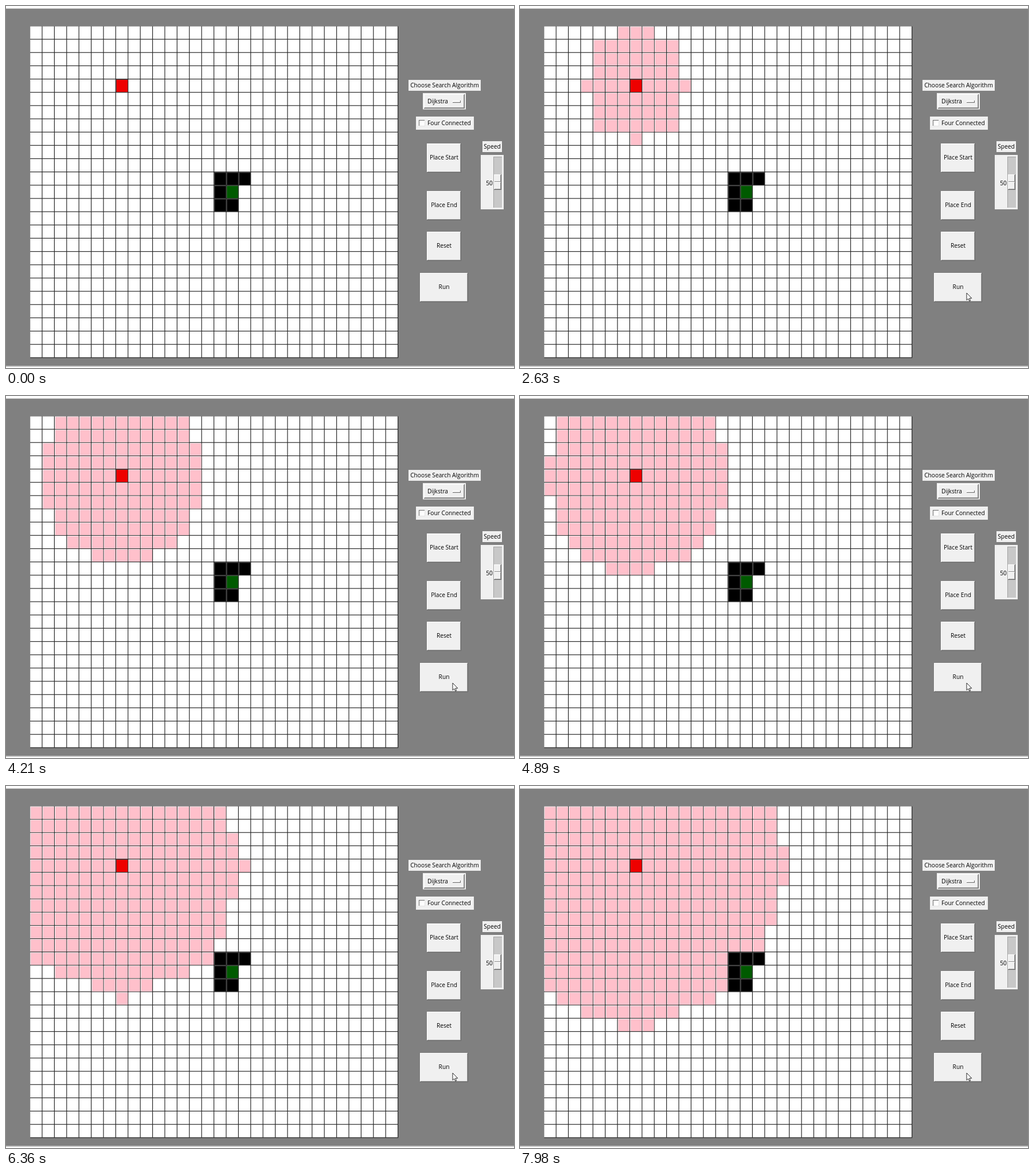
Animation of 886x632 px, one loop 8 s. Source, as an HTML page with a canvas:

```html
<!DOCTYPE html>
<html lang="en">
<head>
<meta charset="utf-8">
<title>Grid search</title>
<style>
  html, body { margin: 0; width: 100%; height: 100%; overflow: hidden; background: #fff; }
  canvas { display: block; }
</style>
</head>
<body>
<canvas id="stage" width="886" height="632"></canvas>
<script>
const ctx = document.getElementById('stage').getContext('2d');
const LOOP = 8000, COLS = 30, ROWS = 25;
const board = { x: 42.2, y: 35.5, cellW: 21.4, cellH: 23.16, gap: 1.2 };
const FACE = '#f0f0f0', LINE = '#282828';
const start = { col: 7, row: 4 }, end = { col: 16, row: 12 };
const walls = new Set(['15,11', '16,11', '17,11', '15,12', '15,13', '16,13']);
const PRESS = 1050, RELEASE = 1300;

// Number of expanded cells (the start included) at given times.
const progress = [[1290, 1], [2630, 55], [3540, 98], [4890, 149], [5700, 187],
  [7010, 240], [7880, 277], [7940, 278], [7980, 279], [8000, 279]];

// Cursor tip: time, x, y.
const cursorPath = [[130, 816, 628], [250, 809, 590], [400, 797, 544], [610, 789, 517],
  [850, 789, 517], [900, 779, 501], [8000, 779, 501]];

function interpolate(points, t) {
  if (t < points[0][0]) return null;
  const i = Math.min(points.findLastIndex(p => p[0] <= t), points.length - 2);
  const a = points[i], b = points[i + 1];
  const k = (t - a[0]) / (b[0] - a[0]);
  return a.slice(1).map((v, n) => v + (b[n + 1] - v) * k);
}

// Eight-connected Dijkstra: octile distance, ties resolved up, right, down, left.
function expansionOrder() {
  const cells = [];
  for (let row = 0; row < ROWS; row++) {
    for (let col = 0; col < COLS; col++) {
      if (walls.has(col + ',' + row) || (col === end.col && row === end.row)) continue;
      const dx = col - start.col, dy = row - start.row;
      const ax = Math.abs(dx), ay = Math.abs(dy);
      const distance = Math.max(ax, ay) + (Math.SQRT2 - 1) * Math.min(ax, ay);
      const side = ay > ax ? (dy < 0 ? 0 : 2) : (dx > 0 ? 1 : 3);
      cells.push({ key: col + ',' + row, dx, dy, distance, side });
    }
  }
  return cells.sort((a, b) =>
    a.distance - b.distance || a.side - b.side || a.dy - b.dy || a.dx - b.dx);
}
const rank = new Map(expansionOrder().map((c, i) => [c.key, i]));

function rect(x, y, w, h, color) {
  ctx.fillStyle = color;
  ctx.fillRect(x, y, w, h);
}

// Face colour and top-left highlight of a cell.
function cellColors(col, row, count) {
  const key = col + ',' + row;
  if (walls.has(key)) return ['#000', '#696969'];
  if (col === end.col && row === end.row) return ['#005a00', '#506850'];
  if (col === start.col && row === start.row) return ['#ee0000', '#804040'];
  return [rank.get(key) < count ? '#ffc0cb' : '#fff', '#fff'];
}

function drawBoard(count) {
  const { x: left, y: top, cellW, cellH, gap } = board;
  rect(left, top, COLS * cellW, ROWS * cellH, LINE);
  for (let row = 0; row < ROWS; row++) {
    for (let col = 0; col < COLS; col++) {
      const [face, light] = cellColors(col, row, count);
      const x = left + col * cellW, y = top + row * cellH;
      const w = cellW - gap, h = cellH - gap;
      rect(x, y, w, h, light);
      if (face !== light) rect(x + 0.9, y + 0.9, w - 0.9, h - 0.9, face);
    }
  }
}

function text(string, x, y, align = 'center') {
  ctx.fillStyle = '#000';
  ctx.textAlign = align;
  ctx.fillText(string, x, y);
}

function bevel(x, y, w, h, sunken = false) {
  rect(x, y, w, h, sunken ? '#fff' : '#696969');
  rect(x, y, w - 1, h - 1, sunken ? '#696969' : '#fff');
  rect(x + 1, y + 1, w - 2, h - 2, sunken ? '#e3e3e3' : '#a0a0a0');
  rect(x + 1, y + 1, w - 3, h - 3, sunken ? '#a0a0a0' : FACE);
  rect(x + 2, y + 2, w - 4, h - 4, FACE);
}

function button(label, x, y, w, h, sunken = false) {
  bevel(x, y, w, h, sunken);
  const shift = sunken ? 1 : 0;
  text(label, x + w / 2 + shift, y + h / 2 + shift);
}

function label(string, x, y, w, h) {
  rect(x, y, w, h, FACE);
  text(string, x + w / 2, y + h / 2 + 0.5);
}

function controls(t) {
  label('Choose Search Algorithm', 702, 129, 126, 19);

  rect(727, 152, 75, 28.5, FACE);
  bevel(729, 154, 71, 25);
  text('Dijkstra', 735, 167, 'left');
  rect(779, 165, 14, 4, '#696969');
  rect(779, 165, 13, 3, '#fff');
  rect(780, 166, 12, 2, FACE);

  rect(715, 193, 101, 23, FACE);
  rect(720, 199, 11, 11, '#e3e3e3');
  rect(720, 199, 10, 10, '#696969');
  rect(721, 200, 9, 9, '#fff');
  text('Four Connected', 735, 205, 'left');

  button('Place Start', 734, 240, 60, 51);
  button('Place End', 734, 323, 60, 51);
  button('Reset', 734, 394, 60, 51);
  button('Run', 722, 466, 84, 51, t >= PRESS && t < RELEASE);

  label('Speed', 831, 236, 34, 19);
  rect(828, 260, 40, 95, FACE);
  rect(850, 263, 15, 89, '#a0a0a0');
  rect(851, 264, 14, 88, '#c8c8c8');
  bevel(851, 294, 13, 27);
  rect(852, 306, 11, 1, '#8a8a8a');
  rect(852, 307, 11, 1, '#fff');
  text('50', 843, 310);
}

function cursor(x, y) {
  const outline = [[0, 0], [0, 12.5], [2.8, 10], [4.8, 14.2], [6.6, 13.4], [4.8, 9.2], [8.8, 9.2]];
  ctx.beginPath();
  outline.forEach(([dx, dy]) => ctx.lineTo(x + dx, y + dy));
  ctx.closePath();
  ctx.fillStyle = '#fff';
  ctx.fill();
  ctx.strokeStyle = '#111';
  ctx.lineWidth = 0.9;
  ctx.stroke();
}

function draw(t) {
  rect(0, 0, 886, 632, '#fff');
  rect(0, 4, 886, 626, '#c0c0c0');
  rect(0, 5, 886, 623, '#808080');

  const reached = interpolate(progress, t);
  drawBoard(reached ? Math.floor(reached[0] + 0.01) : 0);

  ctx.font = '10.2px "Open Sans", "Noto Sans", sans-serif';
  ctx.textBaseline = 'middle';
  controls(t);

  const tip = interpolate(cursorPath, t);
  if (tip) cursor(Math.round(tip[0]), Math.round(tip[1]));
}

function tick() {
  draw(performance.now() % LOOP);
  requestAnimationFrame(tick);
}
tick();
</script>
</body>
</html>
```
